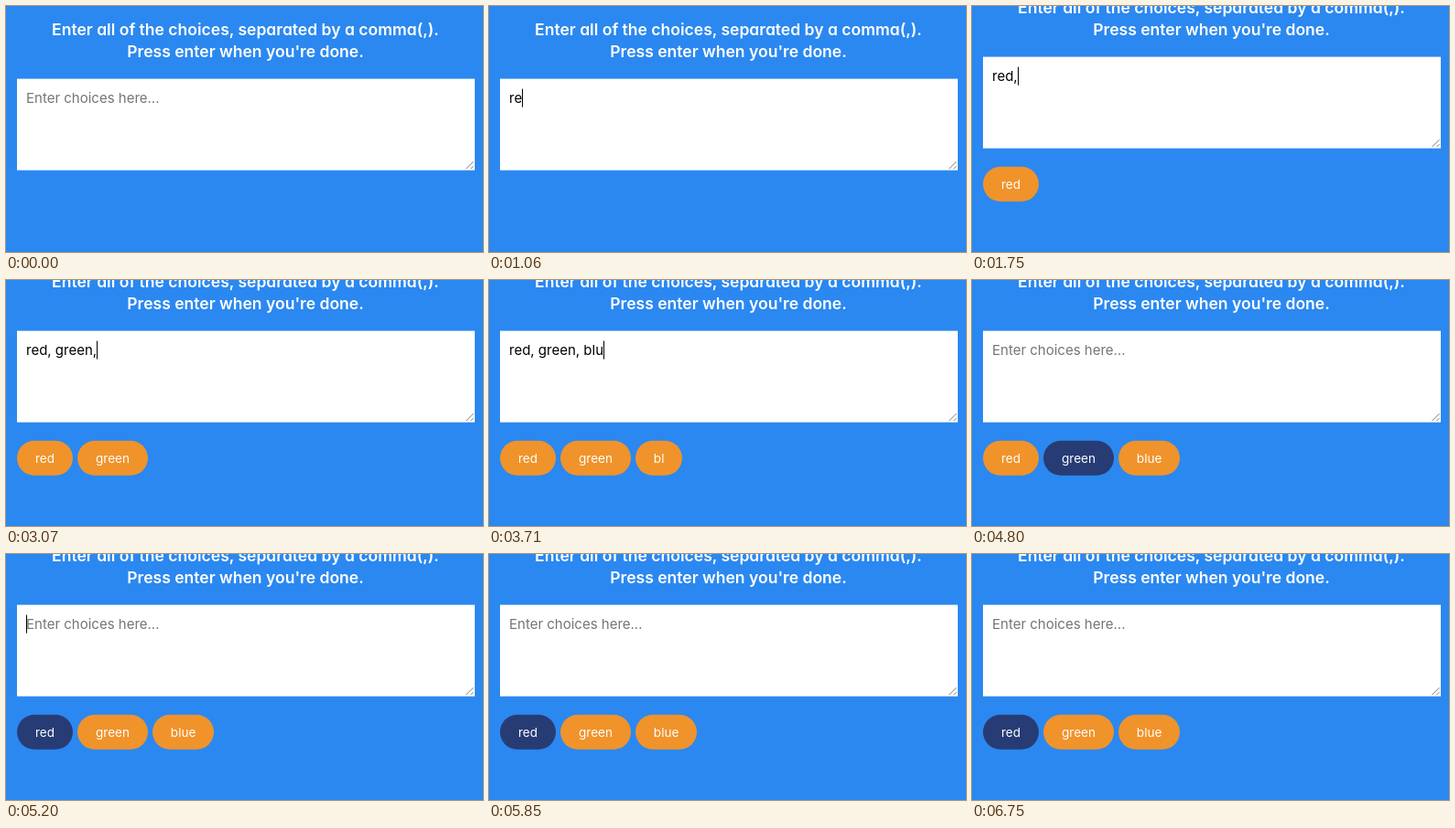
Write an HTML page that moves like this. It is 521 px wide and 269 px high and loops after 6.91 s.

```html
<!DOCTYPE html>
<html lang="en">
<head>
<meta charset="utf-8">
<title>Random choice picker</title>
<style>
  html, body { margin: 0; width: 100%; height: 100%; overflow: hidden; }
  body {
    position: relative;
    background: #2b88f0;
    font-family: Inter, "Open Sans", sans-serif;
    font-feature-settings: "cv11", "calt" 0;
  }
  .page { position: absolute; inset: 0; }
  .page.raised { top: -24px; }
  h3 {
    position: absolute; left: 0; top: 14px; width: 523px; margin: 0;
    color: #fff; font-size: 17.55px; font-weight: 600; line-height: 23.5px;
    text-align: center; white-space: nowrap;
  }
  .field {
    position: absolute; left: 12px; top: 80px; width: 500px; height: 100px;
    box-sizing: border-box; padding: 11px 10px; background: #fff;
    font-size: 15px; line-height: 20px; white-space: pre;
    transform: translateY(-.4px);
  }
  .field.empty::after { content: "Enter choices here..."; color: #757575; }
  .caret {
    display: inline-block; width: 1px; height: 20px; margin-right: -1px;
    background: #000; vertical-align: top;
  }
  .grip { position: absolute; right: 0; bottom: 0; }
  .tags {
    position: absolute; left: 12px; top: 200px; display: flex; gap: 5px;
    transform: translateY(-.3px);
  }
  .tag {
    padding: 11px 20px 9px; border-radius: 50px; background: #f0932b;
    color: #fff; font-size: 13.5px; line-height: 17.5px;
  }
  .tag.on { background: #273c75; }
</style>
</head>
<body>
<div class="page" id="page">
  <h3>Enter all of the choices, separated by a comma(,).<br>Press enter when you're done.</h3>
  <div class="field" id="field"><span id="typed"></span><span class="caret" id="caret"></span><svg class="grip" width="11" height="11" fill="none" stroke="#777"><path d="M1.5 9.5l8-8M6.5 9.5l3-3"/></svg></div>
  <div class="tags" id="tags"></div>
</div>
<script>
  const LOOP = 6910, FOCUS = 540, ENTER = 4120, BLINK = 510;
  const TAG_LAG = 120;
  const DRAW_START = 4240, DRAW_STEP = 80, DRAWS = 12;

  // Bursts of evenly spaced keystrokes
  const BURSTS = [
    { text: "re", start: 1050, gap: 10 },
    { text: "d", start: 1260, gap: 0 },
    { text: ", ", start: 1750, gap: 160 },
    { text: "green", start: 2070, gap: 180 },
    { text: ", ", start: 3070, gap: 240 },
    { text: "blue", start: 3390, gap: 120 }
  ];

  const [page, field, typed, caret, tags] =
    ["page", "field", "typed", "caret", "tags"].map(id => document.getElementById(id));

  const textAt = t => BURSTS.map(({ text, start, gap }) =>
    [...text].filter((_, i) => t >= start + i * gap).join("")).join("");

  const namesAt = t =>
    textAt(t - TAG_LAG).split(",").map(name => name.trim()).filter(Boolean);

  // The highlight runs through the tags and stops on the last draw
  function litTag(t, count) {
    if (t < DRAW_START) return -1;
    return Math.min(Math.floor((t - DRAW_START) / DRAW_STEP), DRAWS) % count;
  }

  // Solid while typing, blinking once the field is idle
  const caretAt = t =>
    t < ENTER ? t >= FOCUS : Math.floor((t - ENTER) / BLINK) % 2 === 0;

  function makeTag(name, on) {
    const tag = document.createElement("span");
    tag.className = on ? "tag on" : "tag";
    tag.textContent = name;
    return tag;
  }

  let shown = "";
  function render(t) {
    const text = t < ENTER ? textAt(t) : "";
    const names = namesAt(t);
    const lit = litTag(t, names.length);
    const caretOn = caretAt(t);
    const state = [text, names, lit, caretOn].join("|");
    if (state === shown) return;
    shown = state;

    typed.textContent = text;
    field.classList.toggle("empty", !text);
    caret.style.visibility = caretOn ? "visible" : "hidden";
    page.classList.toggle("raised", names.length > 0);
    tags.replaceChildren(...names.map((name, i) => makeTag(name, i === lit)));
  }

  const start = performance.now();
  function frame() {
    render((performance.now() - start) % LOOP);
    requestAnimationFrame(frame);
  }
  frame();
</script>
</body>
</html>
```
